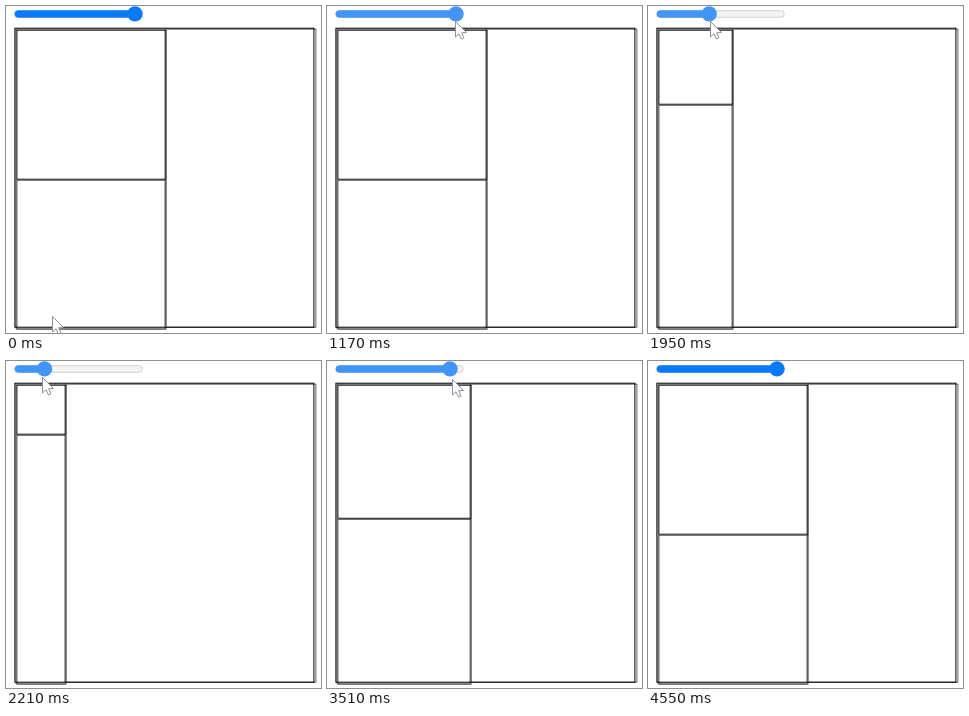
Recreate the animation shown at these times as an HTML page with a canvas. Size 315x327 px, loop 4.81 s.

```html
<!DOCTYPE html>
<html lang="en">
<head>
<meta charset="utf-8">
<title>Slider layout</title>
<style>
  html, body { margin: 0; width: 100%; height: 100%; overflow: hidden; background: #fff; }
  canvas { display: block; }
</style>
</head>
<body>
<canvas id="stage" width="315" height="327"></canvas>
<script>
const ctx = document.getElementById('stage').getContext('2d');
const TICK = 130, TICKS = 37;
const MIN = 16, MAX = 129;
const PRESS = 8, RELEASE = 30, LEAVE = 35;

// The drag there and back: tick, thumb x, pointer x
const drag = [[10, 129, 128], [11, 116.2, 120], [12, 95.2, 100], [17, 38.5, 36], [20, 16, 12],
  [22, 16, 12], [24, 61, 58], [26, 117, 116], [28, 129, 134]];

const lerp = (a, b, p) => a + (b - a) * p;

function sample(tick, column) {
  const next = drag.findIndex(k => k[0] > tick);
  if (next === 0) return drag[0][column];
  if (next < 0) return drag[drag.length - 1][column];
  const a = drag[next - 1], b = drag[next];
  return lerp(a[column], b[column], (tick - a[0]) / (b[0] - a[0]));
}

const thumbAt = tick => sample(tick, 1);

function pointerAt(tick) {
  if (tick < 6) {
    const p = (tick / 6) ** 3;
    return [lerp(46, 128, p), lerp(310, 15, p)];
  }
  if (tick > 28) {
    const p = Math.max(0, (tick - 29) / 5) ** 2;
    return [lerp(134, 54, p), lerp(18, 300, p)];
  }
  return [sample(tick, 2), lerp(14.5, 18, Math.max(0, (tick - 10) / 18))];
}

function box(x, y, w, h, color) {
  ctx.strokeStyle = color;
  ctx.lineWidth = 1;
  ctx.strokeRect(x + 0.5, y + 0.5, w - 1, h - 1);
}

function bar(w, fill, edge) {
  ctx.beginPath();
  ctx.roundRect(8.9, 4.7, w, 6.6, 3.3);
  ctx.fillStyle = fill;
  ctx.fill();
  ctx.strokeStyle = edge;
  ctx.lineWidth = 0.8;
  ctx.stroke();
}

function drawSlider(x, color) {
  bar(127.4, '#f3f3f3', '#c8c8c8');
  bar(x - 8.9, color, color);
  ctx.beginPath();
  ctx.arc(x, 7.9, 7.7, 0, Math.PI * 2);
  ctx.fillStyle = color;
  ctx.fill();
}

function drawLayout(size) {
  ctx.save();
  ctx.translate(0.4, 0.7);
  box(9, 22, size, 300, '#777');
  box(9 + size, 22, 301 - size, 299, '#666');
  box(10, 23, size, size, '#111');
  box(10, 23 + size, size, 300 - size, '#444');
  box(8, 21, 300, 300, '#000');
  ctx.restore();
}

function drawPointer(x, y) {
  ctx.save();
  ctx.translate(Math.round(x) + 0.5, Math.round(y) + 0.5);
  ctx.beginPath();
  [[0, 0], [0, 15.5], [3.5, 12.3], [6, 17.5], [8.4, 16.4], [6.2, 11.3], [11, 11]]
    .forEach(p => ctx.lineTo(...p));
  ctx.closePath();
  ctx.fillStyle = '#fff';
  ctx.fill();
  ctx.strokeStyle = '#8b909c';
  ctx.lineWidth = 1;
  ctx.stroke();
  ctx.restore();
}

function sliderColor(tick) {
  if (tick >= PRESS && tick < RELEASE) return '#4095f6';
  return tick >= 6 && tick < PRESS ? '#005cc8' : '#0a7afc';
}

function draw(tick) {
  ctx.fillStyle = '#fff';
  ctx.fillRect(0, 0, 315, 327);
  // The layout follows the slider one tick late
  const value = (thumbAt(tick - 1) - MIN) / (MAX - MIN);
  drawLayout(Math.max(50, 150 * value));
  drawSlider(thumbAt(tick), sliderColor(tick));
  if (tick < LEAVE) drawPointer(...pointerAt(tick));
}

const start = performance.now();
function loop() {
  draw(Math.floor((performance.now() - start) / TICK) % TICKS);
  requestAnimationFrame(loop);
}
loop();
</script>
</body>
</html>
```
